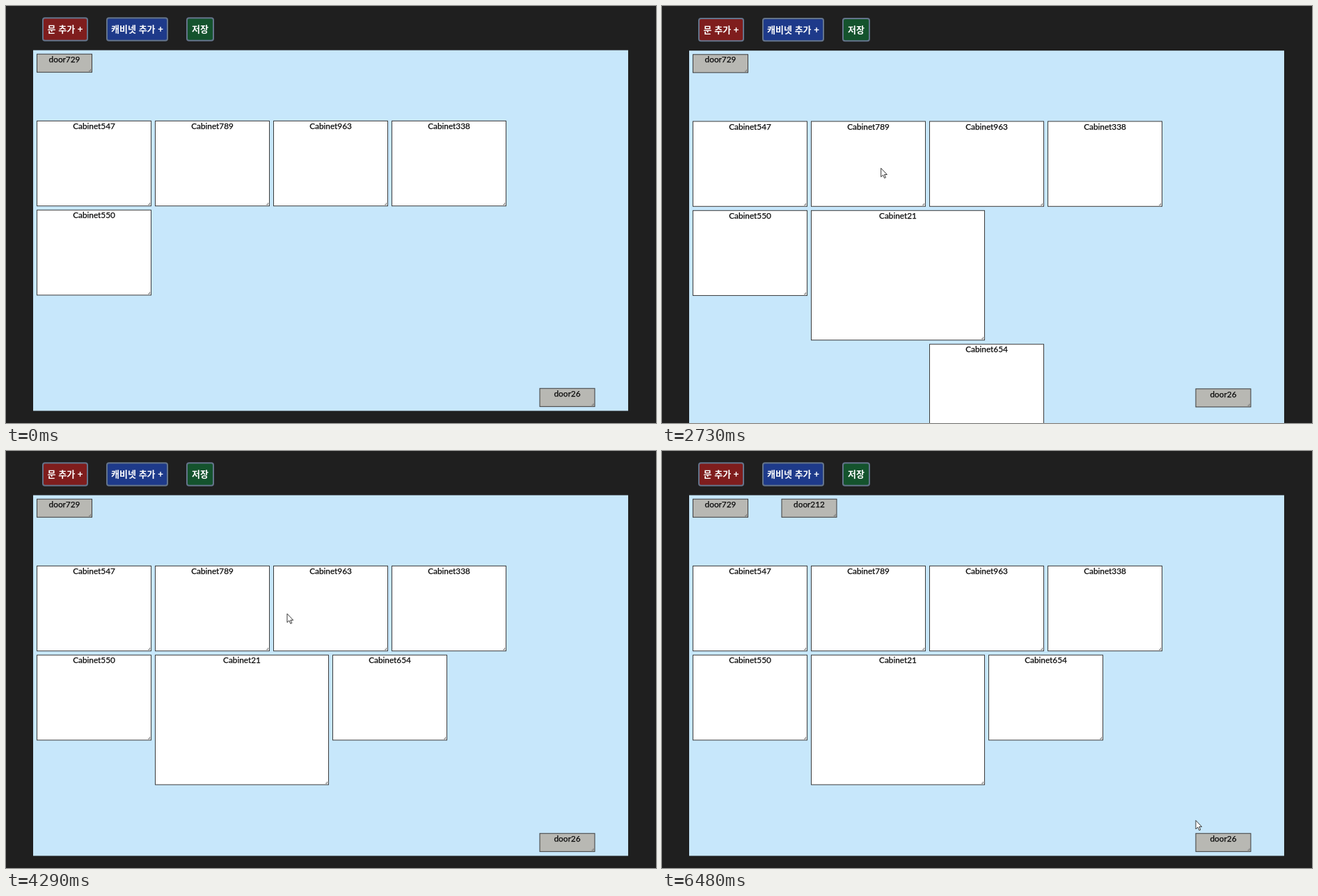
An HTML page for the animation above (6.51 s loop, 934 px wide and 600 px high).

```html
<!DOCTYPE html>
<html lang="ko">
<head>
<meta charset="utf-8">
<title>Cabinet layout editor</title>
<style>
html, body { margin: 0; width: 100%; height: 100%; overflow: hidden; background: #1f1f1f; }
svg { display: block; }
text { text-anchor: middle; }
.button rect { stroke: #64748b; stroke-width: 2; }
.button text { font: bold 13px "Noto Sans CJK KR", "Noto Sans CJK", sans-serif; fill: #fff; }
.item rect { fill: #fff; stroke: #3a3a3a; }
.item text { font: 11.8px Lato, sans-serif; fill: #0a0a0a; stroke: #0a0a0a; stroke-width: .25px; }
.item path { fill: none; stroke: #777; }
.door rect { fill: #b8b8b3; }
</style>
</head>
<body>
<svg id="stage" width="934" height="600">
  <g id="page">
    <rect id="board" x="39" y="63.6" width="855" fill="#c7e7fb"/>
    <rect id="ghost" fill="#b4cffa"/>
  </g>
  <circle id="dot" r="9.5" fill="#fff35a" fill-opacity=".78"/>
  <path id="arrow" d="M0 .5V13L2.9 10.3 4.9 14.8 6.8 14 4.9 9.7H8.7Z" fill="#fff" stroke="#222" stroke-width=".9"/>
</svg>
<script>
const LOOP = 6510, COL = 42.5, ROW = 32.07, GAP = 5, X0 = 44, Y0 = 68.7;
const $ = id => document.getElementById(id);
const page = $('page'), board = $('board'), ghost = $('ghost'), dot = $('dot'), arrow = $('arrow');

function add(parent, tag, attrs = {}, text = '') {
  const el = document.createElementNS('http://www.w3.org/2000/svg', tag);
  set(el, attrs).textContent = text;
  parent.append(el);
  return el;
}

function set(el, attrs) {
  for (const key in attrs) el.setAttribute(key, attrs[key]);
  return el;
}

const show = (el, on) => set(el, { visibility: on ? 'visible' : 'hidden' });
const moveTo = (el, x, y) => set(el, { transform: `translate(${x} ${y})` });
const within = ([from, to], t) => t >= from && t < to;
const smooth = (from, to, t) => {
  const p = Math.max(0, Math.min(1, (t - from) / (to - from || 1)));
  return p * p * (3 - 2 * p);
};

function button(label, x, width, fill) {
  const g = add(page, 'g', { class: 'button' });
  add(g, 'rect', { x: x + 1, y: 17.3, width: width - 2, height: 32.4, rx: 3, fill });
  add(g, 'text', { x: x + width / 2, y: 38.4 }, label);
}

// Grid cell to pixel rectangle.
const cell = (col, row, w, h) => [X0 + col * COL, Y0 + row * ROW, w * COL - GAP, h * ROW - GAP];
const snap = ([x, y, w, h]) => cell(...[
  (x - X0) / COL, (y - Y0) / ROW, (w + GAP) / COL, (h + GAP) / ROW].map(Math.round));

function item(kind, name, rect) {
  const g = add(page, 'g', { class: 'item ' + kind });
  add(g, 'rect', { x: .5, y: .5 });
  add(g, 'text', { y: 12.2 }, name);
  add(g, 'path');
  place(g, rect);
  return g;
}

function place(g, [x, y, width, height]) {
  const [box, label, handle] = g.children;
  moveTo(g, x, y);
  set(box, { width: width - 1, height: height - 1 });
  set(label, { x: width / 2 });
  set(handle, { d: `M${width - 5} ${height - 2.5}h2.5v-2.5` });
}

const cabinet = (id, col, row) => item('cabinet', 'Cabinet' + id, cell(col, row, 4, 4));
const door = (id, col, row) => item('door', 'door' + id, cell(col, row, 2, 1));
const lifted = (x, y) => [x, y, ...cell(0, 0, 4, 4).slice(2)];

button('문 추가 +', 52, 66, '#7f1d1d');
button('캐비넷 추가 +', 144, 89, '#1e3a8a');
button('저장', 259, 40, '#14532d');
door(729, 0, 0);
door(26, 17, 15);
[547, 789, 963, 338, 550].forEach((id, i) => cabinet(id, i % 4 * 4, i < 4 ? 3 : 7));

// Stops are [arrive, leave, values]; travel between them is eased.
function track(stops, t) {
  const next = stops.findIndex(stop => stop[0] > t);
  if (next < 0) return stops[stops.length - 1][2];
  if (next === 0) return stops[0][2];
  const [, leave, a] = stops[next - 1], [arrive, , b] = stops[next];
  const p = smooth(leave, arrive, t);
  return a.map((v, i) => v + (b[i] - v) * p);
}

const addCabinet = [192, 38], addDoor = [88, 36];
const pointer = [
  [40, 40, [888, 1]],
  [660, 820, addCabinet],
  [1160, 1160, [419, 438]],
  [1440, 1680, [366, 403]],
  [1900, 2110, [451, 467]],
  [2430, 2560, addCabinet],
  [2960, 3240, [505, 535]],
  [3290, 3290, [560, 534]],
  [3400, 3400, [590, 534]],
  [3830, 3830, [585, 370]],
  [3950, 4130, [590, 350]],
  [4520, 4820, addDoor],
  [5000, 5000, [320, 317]],
  [5420, 5480, [94, 115]],
  [5900, 6200, [226, 88]],
  [6480, LOOP, [767, 531]]
];

// Each mover appears at `born` and is held during `grab`.
const movers = [
  { el: cabinet(21, 4, 7), born: 780, grab: [1500, 1900], stops: [
    [0, 1680, cell(4, 7, 4, 4)],
    [1900, LOOP, cell(4, 7, 6, 6)]] },
  { el: cabinet(654, 8, 13), born: 2530, grab: [3050, 3900], stops: [
    [0, 3240, cell(8, 13, 4, 4)],
    [3290, 3290, lifted(424, 489)],
    [3400, 3400, lifted(469, 489)],
    [3830, 3830, lifted(464, 321)],
    [4040, LOOP, cell(10, 7, 4, 4)]] },
  { el: door(212, 0, 1), born: 4640, grab: [5480, 5900], stops: [
    [0, 5480, cell(0, 1, 2, 1)],
    [5990, LOOP, cell(3, 0, 2, 1)]] }
];

// The drop area glides to each new cell over 100 ms.
function glide(stops, t) {
  const sum = [0, 0, 0, 0], n = 50;
  for (let i = 0; i < n; i++) {
    snap(track(stops, t - i * 100 / n)).forEach((v, k) => sum[k] += v / n);
  }
  return sum;
}

function draw(t) {
  let held = null, clicking = false;
  for (const m of movers) {
    show(m.el, t >= m.born);
    place(m.el, track(m.stops, t));
    if (within(m.grab, t)) held = m;
    if (within([m.born - 80, m.born], t)) clicking = true;
  }
  show(ghost, held);
  if (held) {
    const [x, y, width, height] = glide(held.stops, t);
    set(ghost, { x, y, width, height });
  }

  // The board gains a row while a cabinet hangs below it, nudging the page.
  const grown = smooth(2530, 2730, t) - smooth(3490, 3690, t);
  set(board, { height: 518.9 + ROW * grown });
  moveTo(page, 0, within([2530, 3600], t) ? .6 : 0);

  const [x, y] = track(pointer, t);
  show(arrow, t >= 40);
  show(dot, held || clicking);
  moveTo(arrow, x, y);
  moveTo(dot, x, y);
}

const start = performance.now();
function tick() {
  draw((performance.now() - start) % LOOP);
  requestAnimationFrame(tick);
}
tick();
</script>
</body>
</html>
```
